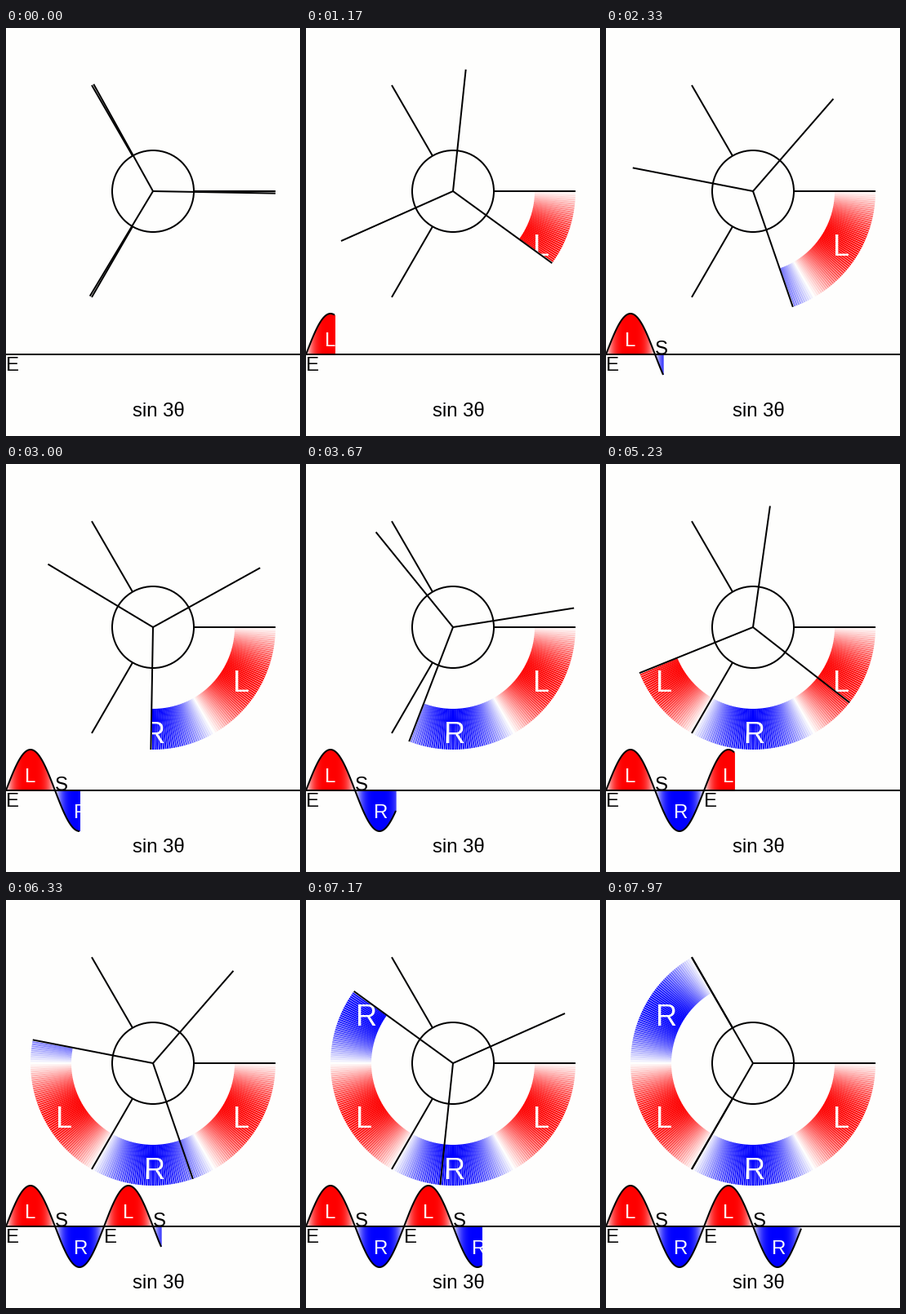
Animation, 360 px wide and 500 px high, one loop 8000 ms. Source, as a matplotlib script:

```python
import numpy as np
import matplotlib.pyplot as plt
from matplotlib.animation import FuncAnimation
from matplotlib.collections import LineCollection
from matplotlib.patches import Circle

W, H, DPI = 360, 500, 100
STEPS = 240                        # degrees swept in one loop
TICKS, TICK_MS = 400, 20           # 5 ticks cover 3 steps
PX = 72 / DPI                      # points per pixel
CENTRE = np.array([180, 200])
HUB, INNER, OUTER = 50, 100, 150   # radii
AXIS, AMP = 400, 50

PAPER = "#fefefd"
RED, BLUE = (1, 0, 0), (0, 0, 1)

plt.rcParams["font.family"] = "Liberation Sans"
fig = plt.figure(figsize=(W / DPI, H / DPI), dpi=DPI, facecolor=PAPER)
ax = fig.add_axes([0, 0, 1, 1])
ax.set_xlim(0, W)
ax.set_ylim(H, 0)
ax.axis("off")


def polar(radius, deg):
    a = np.radians(deg)
    return CENTRE + radius * np.array([np.cos(a), np.sin(a)])


def wave(deg):
    return np.sin(np.radians(3 * deg))


def shade(deg):
    """Red for positive values, blue for negative, fading out near zero."""
    s = wave(deg)
    return (*(RED if s > 0 else BLUE), abs(s))


def stroke(xs=(), ys=(), z=4):
    return ax.plot(xs, ys, color="black", lw=2 * PX, solid_capstyle="butt",
                   snap=False, zorder=z)[0]


def spoke(line, r0, r1, deg):
    line.set_data(*zip(polar(r0, deg), polar(r1, deg)))


def label(x, y, text, size=24, color="black"):
    return ax.text(x, y, text, fontsize=size * PX, color=color, zorder=3,
                   ha="left", va="baseline")


degs = np.arange(STEPS)
heights = AXIS - AMP * wave(degs)
shades = [shade(d) for d in degs]
rays = [(polar(INNER, d), polar(OUTER, d)) for d in degs]
columns = [((d, AXIS), (d, y)) for d, y in zip(degs, heights)]

fills = []
for segments in (rays, columns):
    fill = LineCollection([], linewidths=2 * PX, zorder=2, snap=False)
    ax.add_collection(fill)
    fills.append((fill, segments))

# Fixed parts
ax.add_patch(Circle(CENTRE, HUB, fill=False, ec="black", lw=2 * PX, zorder=4))
stroke([0, W], [AXIS, AXIS])
for d in (0, 120, 240):
    spoke(stroke(), HUB, OUTER, d)
label(155, 475.5, "sin 3θ")

# Pole names only show once colour lies behind them
for k, name in enumerate("LRLR"):
    x, y = polar((INNER + OUTER) / 2, 30 + 60 * k)
    label(x - 10.5, y + 16.5, name, 36, PAPER)
    label(60 * k + 23, 390 if name == "L" else 434, name, 24, PAPER)

marks = [(60 * k, label(60 * k, 420 if name == "E" else 400, name))
         for k, name in enumerate("ESES")]
curve = stroke()
blades = [stroke(z=5) for _ in range(3)]


def draw(tick):
    step = (3 * tick + 2) // 5
    n = step + 1
    for fill, segments in fills:
        fill.set_segments(segments[:n])
        fill.set_color(shades[:n])
    curve.set_data(degs[:n], heights[:n])
    for k, blade in enumerate(blades):
        spoke(blade, 0, OUTER, n + 120 * k)
    for start, mark in marks:
        mark.set_visible(step >= start)
    return []


anim = FuncAnimation(fig, draw, frames=TICKS, interval=TICK_MS,
                     init_func=lambda: draw(0), repeat=True, repeat_delay=0)
plt.show()
```
